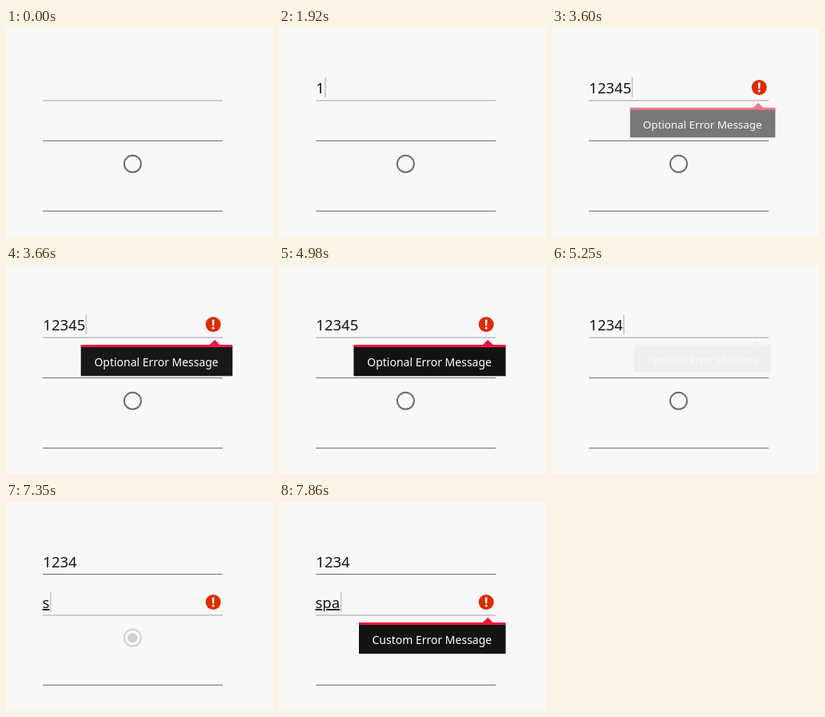
Recreate the animation shown at these times as an HTML page. Size 334 by 262 pixels, loop 8000 ms.

```html
<!DOCTYPE html>
<html lang="en">
<head>
<meta charset="utf-8">
<title>Form validation</title>
<style>
  html, body { margin: 0; width: 100%; height: 100%; overflow: hidden; background: #f8f8f8; }
  svg { display: block; width: 334px; height: 262px; font-family: "Noto Sans", "Open Sans", sans-serif; }
  .entry { font-size: 18.5px; fill: #141414; }
  .label { font-size: 14px; fill: #fff; text-anchor: middle; }
</style>
</head>
<body>
<svg id="stage" viewBox="0 0 334 262"></svg>
<script>
const LOOP = 8000;
const ROW = 51;          // distance between the two fields
const LEFT = 46;
const stage = document.getElementById('stage');

const field = (i) => `
  <g transform="translate(0 ${i * ROW})">
    <rect id="line${i}" x="${LEFT}" y="90" width="225"/>
    <text id="text${i}" class="entry" x="${i ? 45.5 : 46.3}" y="82"${i ? ' text-decoration="underline"' : ''}></text>
    <rect id="caret${i}" y="62" width="1.6" height="25" fill="#c6c6c6"/>
    <g id="icon${i}">
      <circle cx="259.2" cy="74.5" r="9.5" fill="#dd2c00"/>
      <path d="M257.8 68.6h2.8l-.4 7.6h-2z" fill="#fff"/>
      <circle cx="259.2" cy="79" r="1.5" fill="#fff"/>
    </g>
  </g>`;

const popup = (i, x, label) => {
  const right = 283.5, mid = (x + right) / 2;
  return `
  <g transform="translate(${mid} ${94 + i * ROW})"><g id="popup${i}"><g transform="translate(${-mid} -94)">
    <rect x="${x}" y="101" width="${right - x}" height="39" fill="#000" opacity=".25"/>
    <rect x="${x}" y="102" width="${right - x}" height="37" fill="#131313"/>
    <rect x="${x}" y="100" width="${right - x}" height="3" fill="#f0143c"/>
    <path d="M254.5 100.2L261.3 93.8L268 100.2z" fill="#f0143c"/>
    <text class="label" x="${mid - 0.4}" y="127">${label}</text>
  </g></g></g>`;
};

stage.innerHTML = `
  <rect width="334" height="262" fill="#f8f8f8"/>
  ${field(0)}${field(1)}
  <rect x="${LEFT}" y="229" width="225" height="1" fill="#707070"/>
  <circle id="ring" cx="158.4" cy="170.3" r="10.5" fill="none" stroke-width="2"/>
  <circle id="dot" cx="158.4" cy="170.3" fill="#d0d0d0"/>
  ${popup(0, 93.5, 'Optional Error Message')}${popup(1, 100, 'Custom Error Message')}`;

const el = (id) => document.getElementById(id);
const set = (id, attrs) => {
  for (const k in attrs) el(id).setAttribute(k, attrs[k]);
};
const clamp = (v) => Math.min(1, Math.max(0, v));
const ease = (t, start, length) => {
  const u = clamp((t - start) / length);
  return u * u * (3 - 2 * u);
};
const within = (t, spans) => spans.some(([a, b]) => t >= a && t < b);

const edits = [
  [[0, ''], [1920, '1'], [2280, '12'], [2730, '123'], [3120, '1234'], [3540, '12345'], [5190, '1234']],
  [[0, ''], [7350, 's'], [7650, 'sp'], [7860, 'spa']]
];
const carets = [
  [[120, 540], [1050, 1500], [1920, 4050], [4560, 4980], [5190, 5700], [6240, 6420]],
  [[6420, 6990], [7350, LOOP]]
];
const errors = [[[3540, 5190]], [[7350, LOOP]]];
const FOCUS = 6420;

function popupLevel(i, t) {
  if (i) return ease(t, 7425, 130);
  if (t < 5160) return ease(t, 3515, 160);
  // a faint trace stays until the focus moves on
  return t < FOCUS ? Math.max(0.03, 1 - ease(t, 5160, 90)) : 0;
}

function caretX(i, text) {
  if (!i) return 46.6 + 10.6 * text.length;
  return text ? 46.2 + el('text1').getComputedTextLength() : 46.6;
}

function draw(t) {
  for (const i of [0, 1]) {
    const text = edits[i].filter(([at]) => t >= at).pop()[1];
    if (el('text' + i).textContent !== text) el('text' + i).textContent = text;

    const focused = (t >= FOCUS) === (i === 1);
    set('line' + i, { height: focused ? 2 : 1, fill: focused ? '#cccccc' : '#707070' });
    set('caret' + i, { x: caretX(i, text), opacity: +within(t, carets[i]) });
    set('icon' + i, { opacity: +within(t, errors[i]) });

    const p = popupLevel(i, t);
    set('popup' + i, { opacity: p, transform: `scale(${0.9 + 0.1 * p})` });
  }

  const k = ease(t, 5835, 210);
  const grey = Math.round(108 + 102 * k);
  set('ring', { stroke: `rgb(${grey},${grey},${grey})` });
  set('dot', { r: 6 * k });
}

const begin = performance.now();
function frame() {
  draw((performance.now() - begin) % LOOP);
  requestAnimationFrame(frame);
}
frame();
</script>
</body>
</html>
```
